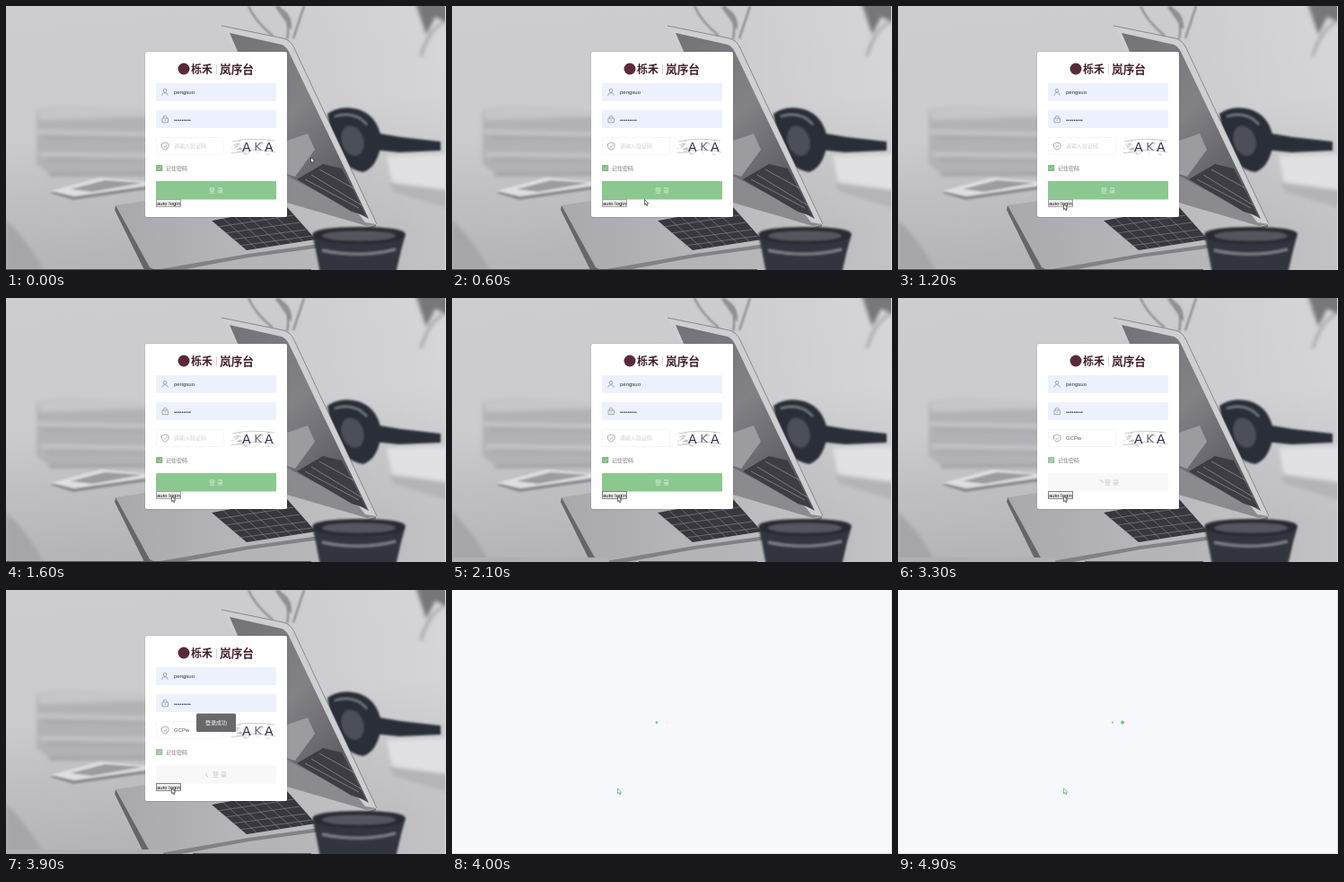
These frames come from a looping animation (490x294 px, 5000 ms). An HTML page:

```html
<!DOCTYPE html>
<html lang="zh">
<head>
<meta charset="utf-8">
<title>Login</title>
<style>
html, body { margin: 0; width: 100%; height: 100%; overflow: hidden; background: #f6f8fb; }
svg { display: block; width: 100vw; height: 100vh; }
text { font: 6px "Liberation Sans", Arial, "Noto Sans CJK SC", "Noto Sans CJK", sans-serif; fill: #333; }
.brand { font-family: "Noto Sans CJK SC", "Noto Sans CJK", sans-serif; font-weight: 700; fill: #43202f; }
.captcha { font: 14px "DejaVu Sans", sans-serif; fill: #2b2b4d; }
.icon { fill: none; stroke: #888; stroke-width: .7; }
</style>
</head>
<body>
<svg viewBox="0 0 490 294">
  <defs>
    <linearGradient id="wall" x2=".2" y2="1">
      <stop stop-color="#cdcdd0"/><stop offset=".5" stop-color="#cbcbce"/>
      <stop offset=".7" stop-color="#c0c0c3"/><stop offset="1" stop-color="#b4b4b7"/>
    </linearGradient>
    <linearGradient id="glow">
      <stop stop-color="#fff" stop-opacity="0"/><stop offset="1" stop-color="#fff" stop-opacity=".2"/>
    </linearGradient>
    <linearGradient id="screen" x2=".7" y2="1">
      <stop stop-color="#737277"/><stop offset=".5" stop-color="#828186"/><stop offset="1" stop-color="#56555b"/>
    </linearGradient>
    <linearGradient id="metal">
      <stop stop-color="#a9a9ad"/><stop offset="1" stop-color="#c3c3c6"/>
    </linearGradient>
    <filter id="soft"><feGaussianBlur stdDeviation="2"/></filter>
    <filter id="near"><feGaussianBlur stdDeviation="1.1"/></filter>
  </defs>

  <g id="login">
    <!-- desk scene -->
    <path d="M0 0H490V294H0z" fill="url(#wall)"/>
    <path d="M300 0H490V294H300z" fill="url(#glow)"/>
    <g filter="url(#soft)">
      <path d="M0 238Q25 262 42 294H0z" fill="#a6a6a9"/>
      <path d="M34 116L70 111 160 117V187L48 187 34 176z" fill="#b2b1b5"/>
      <path d="M35 117L72 111 160 117V123L38 127z" fill="#c6c6c9"/>
      <path d="M35 140L160 143M38 165L160 167" stroke="#c8c8cb" stroke-width="4"/>
      <path d="M42 146L160 148M45 171L160 172" stroke="#a7a6aa" stroke-width="3"/>
      <path d="M48 188L160 187" stroke="#9b9a9f" stroke-width="3"/>
      <path d="M456 -4H494V20L478 12 468 32z" fill="#77777a"/>
      <path d="M487 18Q470 28 462 56" stroke="#88888b" stroke-width="2" fill="none"/>
      <path d="M424 167L494 165V205L430 196z" fill="#e1e1e3"/>
      <path d="M426 197L494 206V226L432 207z" fill="#b4b4b7"/>
    </g>
    <g filter="url(#near)">
      <path d="M270 0Q278 18 297 33M332 0L320 36M303 0Q318 15 313 37" stroke="#77777a" stroke-width="1.8" fill="none"/>
      <path d="M299 0Q320 5 318 27Q309 14 299 0" fill="#8d918f"/>
      <path d="M49 208L105 192 165 198V203L75 216z" fill="#8a898e"/>
      <path d="M50 206L105 191 160 196V200L76 212z" fill="#dedee1"/>
      <path d="M72 204L110 194 152 197 96 207z" fill="#9c9ba0"/>
      <!-- headphones -->
      <path d="M404 140L440 146 484 151V161L438 163 408 160z" fill="#2c2f37"/>
      <path d="M358 120Q372 110 392 115 414 122 418 148 416 178 398 185 378 182 364 160z" fill="#2c2f37"/>
      <ellipse cx="386" cy="150" rx="12" ry="17" fill="#4d5059" transform="rotate(-18 386 150)"/>
      <path d="M366 123Q388 116 402 132" stroke="#777a81" stroke-width="2" fill="none"/>
    </g>
    <!-- laptop -->
    <path d="M122 222L155 217 320 214 412 243 358 264 270 276 167 294H158z" fill="url(#metal)"/>
    <path d="M122 222L160 291 166 294H154L121 227z" fill="#66656a"/>
    <path d="M166 294L270 276 356 264 412 243V246L358 268 270 280 195 294z" fill="#828186"/>
    <path d="M229 239L313 224 345 260 268 272z" fill="#37373d"/>
    <g stroke="#8d8c92" stroke-width=".6">
      <path d="M236 246L320 233M244 253L327 241M252 260L334 249M259 267L341 256"/>
      <path d="M242 237L279 270M255 235L292 268M268 233L305 266M281 231L318 264M294 229L331 262"/>
    </g>
    <path d="M313 186L412 243 402 245 313 219z" fill="#8b8a8f"/>
    <path d="M240 22L309 36Q317 38 321 47L413 243 400 241 256 51z" fill="#cfcfd2"/>
    <path d="M249 30L307 43Q312 45 315 51L404 237 313 189 262 60z" fill="url(#screen)"/>
    <path d="M313 150L336 142 344 160 322 190 313 187z" fill="#9c9ba0"/>
    <path d="M324 193L353 176 374 181 401 234 385 229z" fill="#3d3d43"/>
    <path d="M333 193L393 225M340 188L396 222M349 182L387 203" stroke="#8d8c92" stroke-width=".8"/>
    <path d="M240 22L309 36Q317 38 321 47L413 243" fill="none" stroke="#77767b" stroke-width=".8"/>
    <!-- mug -->
    <g filter="url(#near)">
      <path d="M341 254Q344 246 394 246T445 254L440 272 434 298H350L345 272z" fill="#33353c"/>
      <ellipse cx="393" cy="256" rx="51" ry="9.500" fill="#2a2c33"/>
      <ellipse cx="393" cy="256" rx="41" ry="5.500" fill="#55575d"/>
      <path d="M352 272Q394 281 434 271" stroke="#7b7d83" stroke-width="3" fill="none"/>
    </g>
    <path id="baseLine" stroke="#55555a"/>
    <path id="status" d="M0 289H175V294H0z" fill="#b0b0b3"/>
    <path d="M489.500 0V294" stroke="#dedee0"/>

    <!-- login card -->
    <rect x="154.500" y="50.500" width="159" height="185.500" rx="2" fill="#000" opacity=".12"/>
    <rect x="155" y="51" width="158" height="184" rx="2" fill="#fff"/>
    <circle cx="198" cy="70" r="6.500" fill="#5a2a3c"/>
    <text class="brand" x="206" y="74.500" style="font-size:12px">栎禾</text>
    <path d="M234.500 65V76" stroke="#c9c0c4" stroke-width=".7"/>
    <text class="brand" x="238" y="75" style="font-size:12.700px">岚序台</text>

    <rect x="167" y="86" width="134" height="20" rx="1" fill="#edf1fd"/>
    <rect x="167" y="116" width="134" height="20" rx="1" fill="#edf1fd"/>
    <rect x="167.500" y="146.500" width="75" height="19" rx="1" fill="#fff" stroke="#f5f5f7"/>
    <g class="icon">
      <circle cx="177" cy="94.300" r="1.800"/><path d="M173.700 99.700Q174 96.600 177 96.600T180.300 99.700"/>
      <path d="M174 125H180.500V129.700H174zM175.300 125V124Q175.300 122.300 177.200 122.300T179.100 124V125M177.200 126.500V128"/>
      <path d="M177.200 152L181 153.400V156.500Q180.500 159 177.200 160.300 174 159 173.500 156.500V153.400zM175.500 156L177 157.400 179.500 154.800"/>
    </g>
    <text x="187" y="98.200">pengsuo</text>
    <text x="187" y="128.500">•••••••••</text>
    <text id="code" x="187" y="158.200"></text>
    <g id="scribble" fill="none" stroke-width=".6"></g>
    <text class="captcha" x="263" y="161.500">A</text>
    <text class="captcha" x="276.300" y="161" style="font-size:13px;fill:#65657c">K</text>
    <text class="captcha" x="288" y="161.500">A</text>
    <rect id="box" x="167" y="177" width="7.300" height="7" rx=".7"/>
    <path d="M168.700 180.500L170.200 182 172.700 179" fill="none" stroke="#d5ead5" stroke-width=".7"/>
    <text x="178" y="182.700" style="fill:#777">记住密码</text>

    <rect id="submit" x="167" y="195" width="134" height="20.500" rx="1"/>
    <path id="spin" d="M0-2.500A2.500 2.500 0 0 0-1.800 1.800" fill="none" stroke="#bbb" stroke-width=".7"/>
    <text id="label" y="208" style="font-size:7px">登 录</text>
    <rect id="auto" x="167.500" y="215.500" width="27" height="8" fill="#efefef"/>
    <text x="168" y="221.700" style="fill:#111">auto login</text>
    <g id="toast">
      <rect x="212" y="137.500" width="44" height="20.500" rx="1.500" fill="#68686a"/>
      <text x="234" y="149.800" text-anchor="middle" style="fill:#fff">登录成功</text>
    </g>
  </g>

  <g id="loading">
    <path d="M0 0H490V294H0z" fill="#f6f8fb"/>
    <path d="M489.500 0V293.500H0" fill="none" stroke="#dfe1e4"/>
    <g fill="#6fc578"><circle cx="228" cy="147.500"/><circle cx="239" cy="147.500"/><circle cx="250" cy="147.500"/></g>
  </g>
  <path id="cursor" d="M0 0V6L1.400 4.800 2.400 7 3.400 6.500 2.400 4.400H4.300z" fill="#fff" stroke-width=".7"/>
</svg>
<script>
const $ = id => document.getElementById(id);
const set = (el, attrs) => { for (const k in attrs) el.setAttribute(k, attrs[k]); };
const show = (id, on) => { $(id).style.display = on ? '' : 'none'; };
const dots = document.querySelectorAll('#loading circle');
const LOOP = 5000, CLICK = 2100, FILL = 2900, SUBMIT = 3000, DONE = 3700, LEAVE = 4000;
const route = [[100, 339.5, 168.5], [600, 214.5, 215.5], [1000, 184.5, 220.8]];

// captcha scribbles
let seed = 7;
const rand = () => (seed = seed * 16807 % 2147483647) / 2147483647;
let marks = '';
for (let i = 0; i < 34; i++) {
  const x = 251 + (i < 20 ? 13 : 45) * rand(), y = 148 + 17 * rand();
  marks += `<path d="M${x} ${y}l${1 + 3 * rand()} ${rand() * 2 - 1}" stroke="hsl(${rand() * 360} 18% 65%)"/>`;
}
$('scribble').innerHTML = marks +
  '<path d="M252 151Q272 146 299 150M253 164Q276 157 300 163" stroke="#aaa9b5"/>';

function pointer(t) {
  let i = 0;
  while (i < route.length - 2 && t > route[i + 1][0]) i++;
  const [a, b] = [route[i], route[i + 1]];
  const p = Math.min(1, Math.max(0, (t - a[0]) / (b[0] - a[0])));
  return [1, 2].map(k => a[k] + (b[k] - a[k]) * p);
}

// grows until 40% of the cycle, shrinks until 80%, then rests
const pulse = ms => Math.max(0, 1 - Math.abs(ms % 1400 / 560 - 1));

function draw(now) {
  const t = Math.floor(now % LOOP / 100) * 100;
  const busy = t >= SUBMIT, filled = t >= FILL, clicked = t >= CLICK, left = t >= LEAVE;
  show('login', !left);
  show('loading', left);
  show('status', clicked);
  show('toast', t >= DONE);
  show('spin', busy);
  set($('baseLine'), { d: clicked ? 'M208 293.5H340' : 'M0 293.5H340' });
  $('code').textContent = filled ? 'GCPw' : '请输入验证码';
  $('code').style.fill = filled ? '#555' : '#cfcfd3';
  set($('submit'), { fill: busy ? '#f8f8f8' : '#8bc88f' });
  set($('box'), { fill: busy ? '#9bcb99' : '#83bd83' });
  set($('label'), { x: busy ? 230 : 226 });
  $('label').style.fill = busy ? '#c4c4c4' : '#dcefdd';
  set($('spin'), { transform: `translate(225.500 205.500) rotate(${t * .36})` });
  set($('auto'), { stroke: clicked ? '#858585' : '#a5a5a5' });
  dots.forEach((dot, i) => set(dot, { r: 3.5 * pulse(t - LEAVE - 100 + (2 - i) * 160) }));
  set($('cursor'), { transform: `translate(${pointer(t)})`, stroke: left ? '#55a765' : '#333' });
}

const start = performance.now();
(function tick() {
  draw(performance.now() - start);
  requestAnimationFrame(tick);
})();
</script>
</body>
</html>
```
